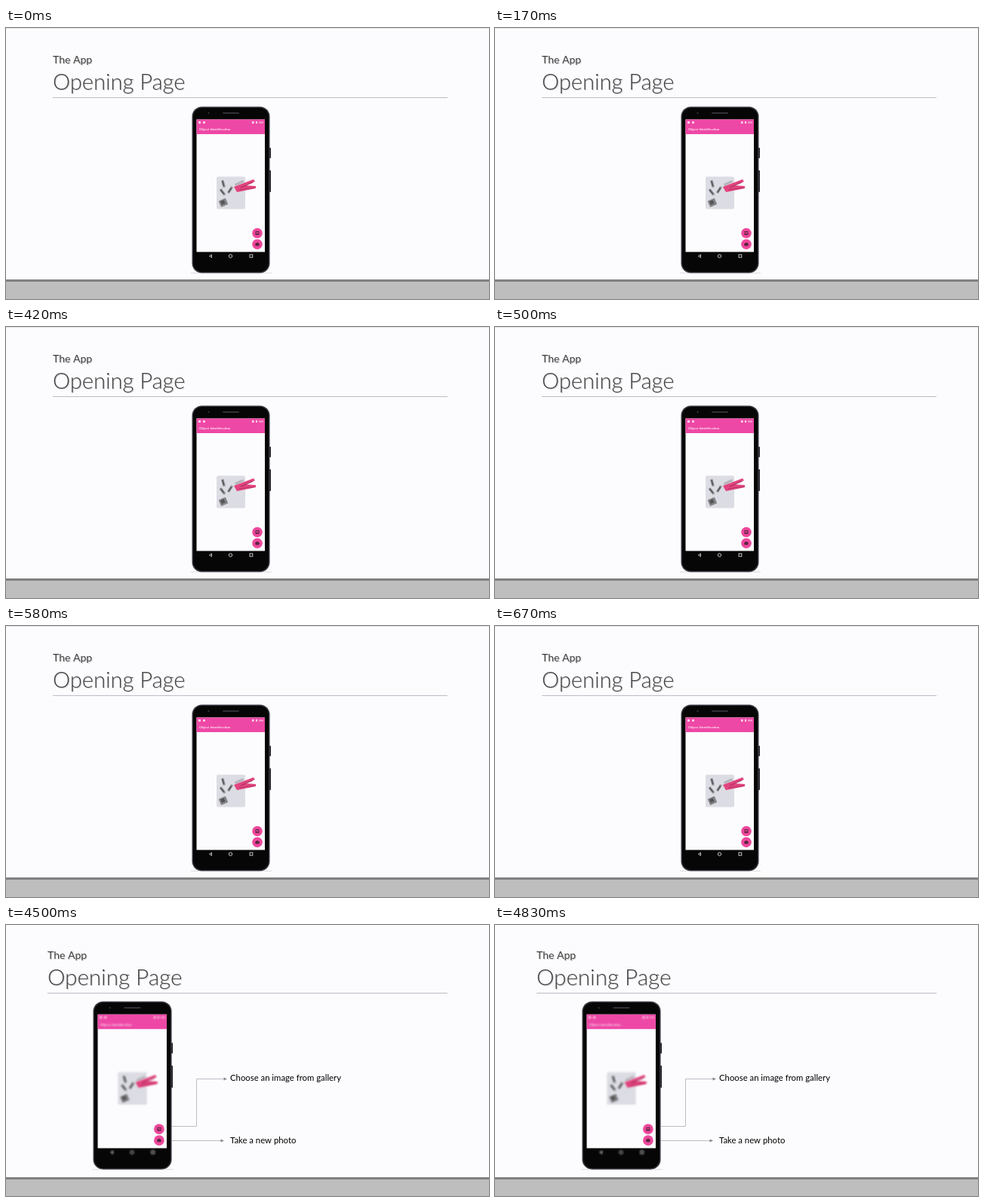
An HTML page with a canvas that plays this animation: 640x360 px, repeating every 8000 ms.

```html
<!DOCTYPE html>
<html lang="en">
<head>
<meta charset="utf-8">
<title>Opening Page</title>
<style>
  html, body { margin: 0; width: 100%; height: 100%; overflow: hidden; background: #fcfcfe; }
  canvas { display: block; }
</style>
</head>
<body>
<canvas id="stage" width="640" height="360"></canvas>
<script>
const ctx = document.getElementById("stage").getContext("2d");
const LOOP = 8000, CUT = 4500;
const PAPER = "#fcfcfe", LINE = "#bdbcc8", PINK = "#ee48a6", INK = "#404040";

function box(x, y, w, h, fill, r = 0) {
  ctx.fillStyle = fill;
  ctx.beginPath();
  ctx.roundRect(x, y, w, h, r);
  ctx.fill();
}

function disc(x, y, r, fill) {
  ctx.fillStyle = fill;
  ctx.beginPath();
  ctx.arc(x, y, r, 0, Math.PI * 2);
  ctx.fill();
}

function path(points, color, width = 1, fill = false) {
  ctx.beginPath();
  points.forEach(([x, y]) => ctx.lineTo(x, y));
  if (fill) {
    ctx.closePath();
    ctx.fillStyle = color;
    ctx.fill();
  } else {
    ctx.strokeStyle = color;
    ctx.lineWidth = width;
    ctx.stroke();
  }
}

function label(text, x, y, size, color, weight = 400) {
  ctx.font = `${weight} ${size}px Lato, "Open Sans", sans-serif`;
  ctx.fillStyle = color;
  ctx.fillText(text, x, y);
}

function shadowed(text, x, y, size, weight) {
  label(text, x + 1, y + 1, size, "#d2d2d6", weight);
  label(text, x, y, size, INK, weight);
}

function slide(x, shift, titleSize, barTop) {
  box(0, 0, 640, 360, PAPER);
  shadowed("The App", x, 47 + shift, 14, 400);
  shadowed("Opening Page", x, 82 + shift, titleSize, 300);
  box(x, 92 + shift, 585 - x, 1, LINE);
  box(0, barTop, 640, 26, "#bebebe");
  box(0, barTop, 640, 3, "#808080");
}

function rotated(x, y, angle, draw) {
  ctx.save();
  ctx.translate(x, y);
  ctx.rotate(angle);
  draw();
  ctx.restore();
}

function picture() {
  box(279, 197.5, 38, 43, "#dcdce4", 2);
  const clips = [[288, 207, 1.3], [287, 218, 0.9], [297, 215, -1.0]];
  for (const [x, y, angle] of clips) {
    rotated(x, y, angle, () => {
      box(-5, -1.8, 10, 3.6, "#98989c", 1);
      box(-4, -0.7, 7, 1.6, "#555558");
    });
  }
  rotated(288, 232, -0.4, () => {
    box(-5, -4.5, 10, 9, "#858588", 1);
    box(-3, -3, 5, 5, "#555558");
  });
  path([[303, 207], [314, 202], [315, 205], [304, 210]], "#b4b4ba", 1, true);
  path([[302, 211], [328, 201], [330, 204], [317, 209], [331, 210],
        [331, 213], [306, 218]], "#e2447f", 1, true);
  path([[311, 212], [327, 205]], "#a92f5e", 1.2);
  path([[309, 215], [329, 212]], "#b6345f", 1);
}

function phoneBody() {
  box(245, 325, 107, 1, "#dcdce2");
  box(348, 159, 3, 14, "#26262c", 1);
  box(348, 189, 3, 29, "#26262c", 1);
  box(246.5, 104.5, 103, 221, "#33333c", 13);
  box(248, 106, 100, 218, "#060606", 12);
  disc(268.5, 113, 1.2, "#303036");
  box(287, 112, 22, 2, "#303036", 1);
  box(252.5, 121.5, 90.5, 176, PAPER);
  box(252.5, 121.5, 90.5, 19.5, PINK);
}

function screenDetails() {
  box(255, 124, 3, 3, "#fbd4e8");
  box(261, 124, 3, 3, "#fbd4e8", 1);
  box(326, 124, 2.5, 3, "#fbd4e8");
  box(331, 124, 2, 3, "#fbd4e8");
  box(335, 124.5, 6, 2, "#f6a3cd");
  label("Object Identification", 256, 136.3, 4.5, "#fde6f2", 700);
  path([[272.5, 301], [269.5, 303], [272.5, 305], [272.5, 301]], "#d4d4d8", 0.9);
  ctx.beginPath();
  ctx.arc(297.5, 303, 2.2, 0, Math.PI * 2);
  ctx.stroke();
  ctx.strokeRect(323, 301, 3.8, 3.8);
}

function buttons() {
  const mark = "#5b2540";
  for (const y of [272.5, 287.3]) disc(333, y, 6.8, "#ee489c");
  ctx.strokeStyle = mark;
  ctx.lineWidth = 1;
  ctx.strokeRect(331, 270.5, 4, 4);
  path([[331, 274], [333, 272.5], [335, 274]], mark);
  box(330.3, 285.8, 5.4, 3.6, mark, 1);
  box(332, 285, 2, 1.2, mark);
}

function phone(blur = 0) {
  const soften = amount => { ctx.filter = blur ? `blur(${amount}px)` : "none"; };
  soften(blur * 0.7);
  phoneBody();
  soften(blur);
  screenDetails();
  picture();
  ctx.filter = "none";
  buttons();
}

function arrow(points) {
  const [x, y] = points[points.length - 1];
  path(points, LINE);
  path([[x - 1, y - 2], [x + 3.5, y], [x - 1, y + 2]], "#85858c", 1, true);
}

function overview() {
  slide(62, 0, 29.1, 334);
  box(0, 0, 640, 1, "#e4e4e8");
  phone();
}

function callouts() {
  slide(55, -2, 29.6, 335);
  ctx.save();
  ctx.translate(116, 101);
  ctx.scale(1.01, 1.01);
  ctx.translate(-247, -104);
  phone(1);
  ctx.restore();
  arrow([[220, 267.5], [252.5, 267.5], [252.5, 204.5], [289.5, 204.5]]);
  arrow([[220, 286.5], [285.5, 286.5]]);
  label("Choose an image from gallery", 297, 207, 11.33, "#000");
  label("Take a new photo", 297, 290, 11.33, "#000");
}

const start = performance.now();

function render() {
  const time = (performance.now() - start) % LOOP;
  if (time < CUT) overview();
  else callouts();
  requestAnimationFrame(render);
}

render();
</script>
</body>
</html>
```
